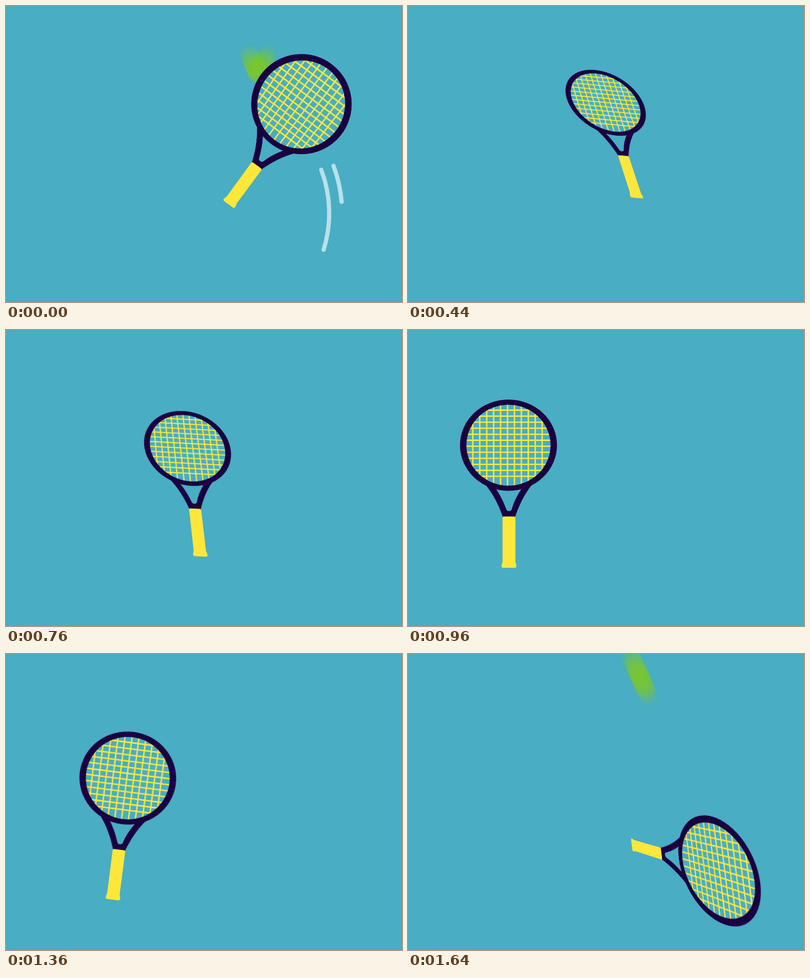
An HTML page with a canvas that plays this animation: 800 px wide and 600 px high, repeating every 1680 ms.

```html
<!DOCTYPE html>
<html lang="en">
<head>
<meta charset="utf-8">
<title>Tennis swing</title>
<style>
  html, body { margin: 0; width: 100%; height: 100%; overflow: hidden; background: #49adc4; }
  canvas, svg { position: absolute; left: 0; top: 0; }
  svg { width: 1px; height: 1px; overflow: visible; transform-origin: 0 0; }
</style>
</head>
<body>
<canvas id="effects" width="800" height="600"></canvas>
<!-- Racket: the origin is the middle of the handle's end -->
<svg id="racket">
  <clipPath id="head"><ellipse cx="-1" cy="-248.5" rx="86" ry="83"/></clipPath>
  <path id="strings" clip-path="url(#head)" fill="none" stroke="#fde73b" stroke-width="2.8"/>
  <g fill="#1a0040" fill-rule="evenodd">
    <path d="M-69-192C-42-166-25-140-12-102H12C25-140 40-165 68-192A91.5 87 0 0 1-69-192Z
             M-27-161Q-14-142-6-120Q-5-115 0-115Q5-115 6-120Q12-141 26-161Z"/>
    <path d="M-99-248.5a98 92.5 0 0 1 196 0a98 92.5 0 0 1-196 0Z
             M-86-248.5a85 82 0 0 1 170 0a85 82 0 0 1-170 0Z"/>
  </g>
  <path fill="#fde73b" d="M-13-101q0-3 3-3H10q3 0 3 3V-12L15-5q1 5-4 5H-11q-5 0-4-5L-13-12Z"/>
</svg>
<script>
const LOOP = 1680, STEP = 40, REST = 480, RAD = Math.PI / 180;
const racket = document.getElementById('racket');
const ctx = document.getElementById('effects').getContext('2d');

const ready = { x: 198, y: 489, tilt: 0, width: 1, turn: 0, length: 1, depth: 0 };
// Key poses of the swing; the ball is hit at 0
const poses = [
  { ...ready, time: -REST },
  { time: -320, x: 215.5, y: 498, tilt: 7.3, width: .975, turn: 7.3, length: .974, depth: -.09 },
  { time: -40, x: 452, y: 386.5, tilt: 83, width: .865, turn: 107, length: .547, depth: -.92 },
  { time: 0, x: 449.5, y: 402, tilt: 36.2, width: .94, turn: 36.2, length: .903, depth: -.37 },
  { time: 120, x: 463.5, y: 389.5, tilt: 4.5, width: .939, turn: -10.5, length: .9, depth: .37 },
  { time: 500, x: 462.5, y: 389, tilt: 5.4, width: .871, turn: -18.2, length: .9, depth: .37 },
  { time: 760, x: 393, y: 459, tilt: 3, width: .969, turn: -6.6, length: .971, depth: .34 },
  { ...ready, time: 960, x: 204, y: 482 },
  { ...ready, time: 1040 }
];

const easeOut = t => 1 - Math.exp(-t / 60);

// Smooth interpolation that never overshoots a pose
function poseAt(t) {
  const last = poses.length - 1;
  if (t >= poses[last].time) return ready;
  const i = poses.findIndex(pose => pose.time > t) - 1;
  const from = poses[i], to = poses[i + 1];
  const span = to.time - from.time, s = (t - from.time) / span, r = 1 - s;
  const rate = (k, key) =>
    (poses[k + 1][key] - poses[k][key]) / (poses[k + 1].time - poses[k].time);
  const slope = (k, key) => {
    if (k === 0 || k === last) return 0;
    const a = rate(k - 1, key), b = rate(k, key);
    return a * b <= 0 ? 0 : 2 * a * b / (a + b);
  };
  const pose = {};
  for (const key in ready) {
    pose[key] = from[key] + (to[key] - from[key]) * s * s * (3 - 2 * s)
      + span * s * r * (r * slope(i, key) - s * slope(i + 1, key));
  }
  return pose;
}

function drawRacket(t) {
  const { x, y, tilt, width, turn, length, depth } = poseAt(t);
  const a = tilt * RAD, b = turn * RAD, w = -depth / 1000;
  const matrix = [
    width * Math.cos(a), width * Math.sin(a), 0, 0,
    x * w - length * Math.sin(b), y * w + length * Math.cos(b), 0, w,
    0, 0, 1, 0,
    x, y, 0, 1
  ];
  racket.style.transform = `matrix3d(${matrix.map(v => v.toFixed(6))})`;
}

// The ball flies straight in and bounces off; overlapping discs blur its motion
function drawBall(t) {
  if (t < -80 || t > 120) return;
  const blur = 20;
  for (let shift = -blur; shift <= blur; shift += 1.4) {
    const time = t + shift;
    const x = 508 + time * (time < 0 ? 1 : 1.2), y = 137 - 2.3 * Math.abs(time);
    ctx.fillStyle = `rgba(122, 198, 48, ${.3 * (1 - Math.abs(shift) / blur)})`;
    ctx.beginPath();
    ctx.arc(x, y, 19.5, 0, 7);
    ctx.fill();
  }
}

function drawTrail(t, radius, head, tail, sweep, tailSpeed) {
  const start = head - sweep * easeOut(t), end = tail - tailSpeed * t;
  if (t < 0 || end <= start) return;
  ctx.lineWidth = 8.5 - t / 60;
  ctx.beginPath();
  ctx.arc(405, 420, radius, start * RAD, end * RAD);
  ctx.stroke();
}

function drawSpark(t, angle, distance) {
  if (t < 40 || t >= 200) return;
  const middle = distance + 60 * (easeOut(t) - easeOut(120));
  const half = 3.5 * (200 - t) / 80;
  const dx = Math.cos(angle * RAD), dy = Math.sin(angle * RAD);
  ctx.lineWidth = 8;
  ctx.beginPath();
  ctx.moveTo(540 + dx * (middle - half), 150 + dy * (middle - half));
  ctx.lineTo(540 + dx * (middle + half), 150 + dy * (middle + half));
  ctx.stroke();
}

let mesh = '';
for (let i = 0; i < 11; i++) mesh += `M${-73 + 14 * i}-340V-160`;
for (let i = 0; i < 12; i++) mesh += `M-90 ${-319.5 + 12.2 * i}H90`;
document.getElementById('strings').setAttribute('d', mesh);
ctx.strokeStyle = '#b8e1e7';
ctx.lineCap = 'round';

const begin = performance.now();
function frame() {
  const clock = Math.floor((performance.now() - begin) / STEP) * STEP;
  const t = (clock + REST) % LOOP - REST;
  ctx.clearRect(0, 0, 800, 600);
  drawBall(t);
  drawTrail(t, 248, -20.8, 17.4, 42.5, .32);
  drawTrail(t, 274, -20.5, -4.8, 45.8, .21);
  drawSpark(t, -50.4, 101);
  drawSpark(t, -25.8, 115);
  drawSpark(t, -7, 123);
  drawRacket(t);
  requestAnimationFrame(frame);
}
frame();
</script>
</body>
</html>
```
